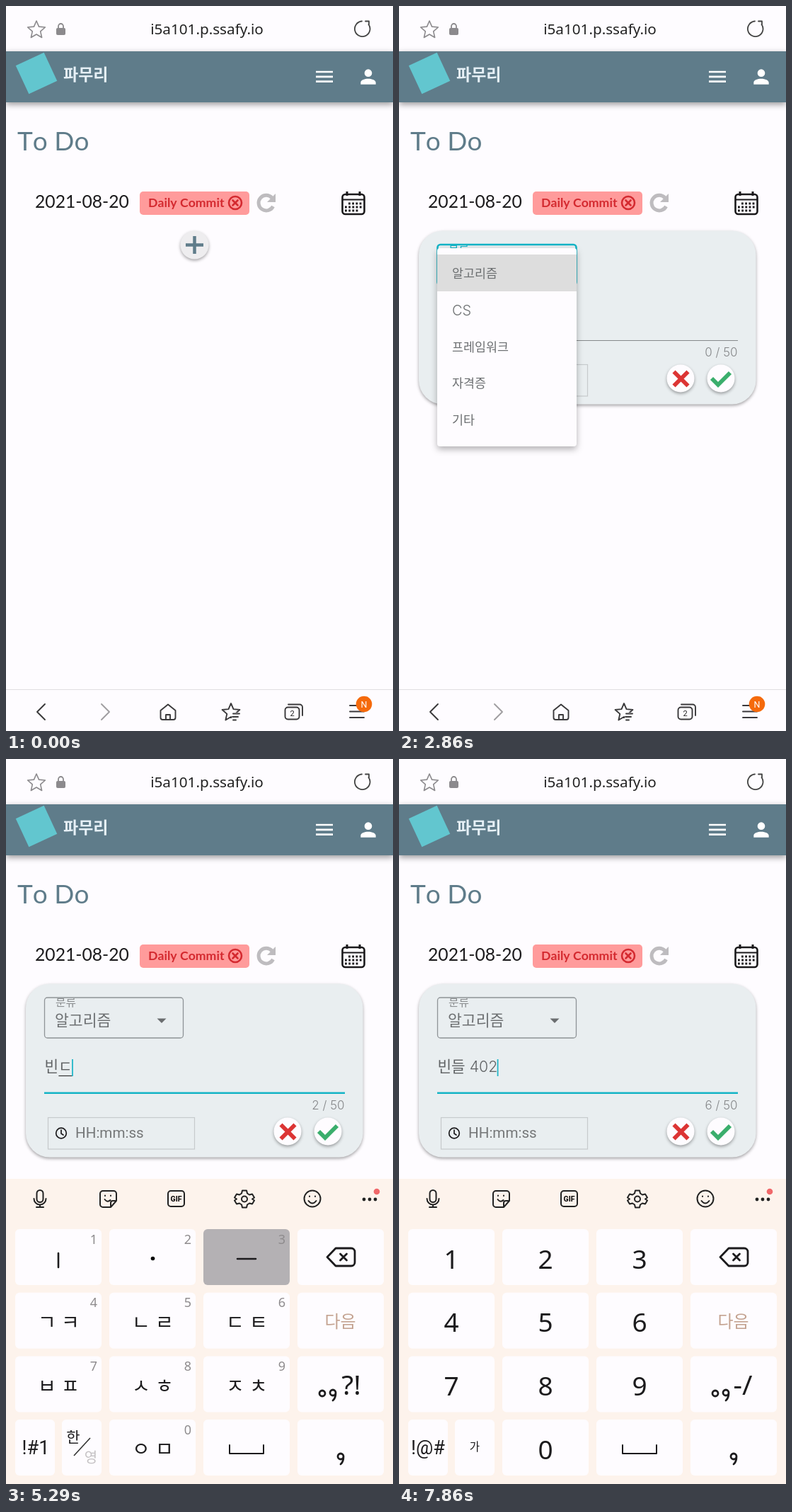
These frames come from a looping animation (547 by 1024 pixels, 8000 ms). An HTML page:

```html
<!DOCTYPE html>
<html lang="ko">
<head>
<meta charset="utf-8">
<title>To Do</title>
<style>
  html, body { margin: 0; width: 100%; height: 100%; overflow: hidden; background: #fefcff; }
  svg { display: block; width: 100vw; height: 100vh; }
  text { font-family: Inter, "Noto Sans CJK KR", "Noto Sans CJK", sans-serif; font-weight: 300; white-space: pre; }
  .lato { font-family: Lato, sans-serif; font-weight: 400; font-kerning: none; }
  .hand { font-family: "Noto Sans", "Noto Sans CJK KR", "Noto Sans CJK", sans-serif; font-weight: 400; }
  .roboto { font-family: Roboto, sans-serif; font-weight: 400; }
  .bold { font-weight: 700; }
  .medium { font-weight: 500; }
  .mid { text-anchor: middle; }
  .line { fill: none; stroke-linecap: round; stroke-linejoin: round; }
  .raised { filter: drop-shadow(0 2px 2px rgba(0, 0, 0, .35)); }
</style>
</head>
<body>
<svg viewBox="0 0 547 1024">
  <defs>
    <path id="star" d="M0-13L3.5-4.9 12.4-4 5.7 1.9 7.6 10.5 0 6-7.6 10.5-5.7 1.9-12.4-4-3.5-4.9z"/>
    <clipPath id="selectClip"><rect x="54" y="338" width="197" height="57"/></clipPath>
  </defs>
  <rect width="547" height="1024" fill="#fefcff"/>

  <!-- address bar -->
  <use href="#star" x="43" y="34" class="line" stroke="#8c8a8d" stroke-width="1.6"/>
  <rect x="71" y="31" width="13" height="10" rx="2" fill="#8c8a8d"/>
  <path d="M74 31v-2.500a3.500 3.500 0 0 1 7 0V31" class="line" stroke="#8c8a8d" stroke-width="1.800"/>
  <text x="284" y="40" class="hand mid" font-size="20.700" fill="#222">i5a101.p.ssafy.io</text>
  <path d="M503 21.500a10.800 10.800 0 1 0 9.500 4.500M508 21.500h5v5" class="line" stroke="#444" stroke-width="1.800"/>

  <!-- app header -->
  <rect y="64" width="547" height="72" fill="#5f7c8a" style="filter:drop-shadow(0 3px 4px rgba(0,0,0,.4))"/>
  <rect x="21" y="73" width="44" height="44" fill="#62c6cf" transform="rotate(-25 43 95)"/>
  <text x="81" y="105" class="bold" font-size="23" fill="#e6f0f6">파무리</text>
  <path d="M438 93h24m-24 6.800h24m-24 6.800h24" fill="none" stroke="#fff" stroke-width="2.700"/>
  <path transform="translate(496 84) scale(1.333)" fill="#fff" d="M12 4a4 4 0 1 1 0 8a4 4 0 1 1 0-8M12 14c4.420 0 8 1.790 8 4v2H4v-2c0-2.210 3.580-4 8-4"/>

  <!-- date row -->
  <text x="16" y="203.500" class="lato" font-size="37" fill="#5f7c8a">To Do</text>
  <text x="41" y="285" class="lato" font-size="24.700" fill="#1c1b1d">2021-08-20</text>
  <rect x="189" y="262" width="155" height="33" rx="5" fill="#ff9b9b"/>
  <text x="201" y="283.500" class="lato bold" font-size="17.700" fill="#d42a30">Daily Commit</text>
  <g class="line" stroke="#d42a30" stroke-width="2.600"><circle cx="324" cy="278" r="9"/><path d="M320.500 274.500l7 7m0-7l-7 7"/></g>
  <path d="M376 271a10.800 10.800 0 1 0 1.500 12" fill="none" stroke="#bebcbf" stroke-width="5"/>
  <path d="M381 265v12h-12z" fill="#bebcbf"/>
  <g fill="none" stroke="#1a191b">
    <rect x="475.500" y="266" width="31" height="28" rx="4" stroke-width="2.600"/>
    <path d="M476 273.500h30" stroke-width="2"/>
    <path d="M482 262v6m18-6v6" stroke-width="3"/>
    <path d="M484 279h20M479 284h25M479 289h20" stroke-width="2.800" stroke-dasharray="2.800 2.400"/>
  </g>

  <g id="addButton">
    <circle id="addDisc" cx="266.500" cy="337.500" r="20" class="raised"/>
    <path d="M254 337.500h25m-12.500-12.500v25" fill="none" stroke="#5f7c8a" stroke-width="4.500"/>
  </g>

  <g id="form">
    <rect x="28" y="317.500" width="476.500" height="245" rx="34" fill="#e9eef0" class="raised"/>
    <rect id="selectBox" x="54.500" y="337" width="196" height="57" rx="4" fill="none"/>
    <g clip-path="url(#selectClip)"><text id="label" x="70">분류</text></g>
    <text id="value" x="69" y="376.500" font-size="21.600" fill="#6c6f71">알고리즘</text>
    <path id="arrow" d="M-6.500-3h13l-6.500 6.500z"/>
    <text id="placeholder" x="54.500" y="442" font-size="21.300" fill="#a3a6a8">할 일을 입력해주세요.</text>
    <text id="entry" x="54.500" y="442" font-size="21.300" fill="#606365"></text>
    <path id="composing" stroke="#333" stroke-width="1.200"/>
    <path id="caret" stroke="#22b6c8" stroke-width="1.800"/>
    <path id="rule" d="M54 472.500h425" stroke-width="1"/>
    <path id="focusRule" stroke="#14b4c6" stroke-width="2.600"/>
    <text id="counter" x="478.500" y="495" font-size="17" fill="#858789" text-anchor="end"></text>
    <rect x="59.500" y="506.500" width="207" height="44.500" fill="none" stroke="#c6cacc" stroke-width="1.200"/>
    <g class="line" stroke="#1c1b1d" stroke-width="1.700"><circle cx="78" cy="528.500" r="7.300"/><path d="M78 524v5l3 2"/></g>
    <text x="98" y="535" class="roboto" font-size="20.600" fill="#757778">HH:mm:ss</text>
    <g fill="#fefcff" class="raised"><circle cx="398" cy="526" r="19.500"/><circle cx="455" cy="526" r="19.500"/></g>
    <path d="M388.500 516.500l20 20m0-20l-20 20" stroke="#dc3434" stroke-width="5.800"/>
    <path d="M442 526l9 9 17-17" fill="none" stroke="#3aae6c" stroke-width="5.800"/>
  </g>

  <g id="menu">
    <rect x="54" y="342" width="197" height="280" rx="4" fill="#fefcff" style="filter:drop-shadow(0 4px 5px rgba(0,0,0,.3))"/>
    <rect id="menuPress" x="54" y="351" width="197" height="52" fill="#ddd"/>
  </g>

  <!-- browser navigation -->
  <path d="M0 965.500h547" stroke="#e0dee1" stroke-width="1.200"/>
  <g class="line" stroke="#3a393b" stroke-width="1.900">
    <path d="M55 986l-11 11 11 11"/>
    <path d="M135 986l11 11-11 11" stroke="#a09ea1"/>
    <path d="M218.500 995l10.500-8.500 10.500 8.500v10a3 3 0 0 1-3 3h-15a3 3 0 0 1-3-3zM226 1008v-7h6v7"/>
    <use href="#star" x="318" y="998"/>
    <path d="M319 998h14v13h-14z" fill="#fefcff" stroke="none"/>
    <path d="M321 999.500h9m-10 4.500h8m-7 4.500h4"/>
    <rect x="394.500" y="990.500" width="20" height="17" rx="4"/>
    <path d="M399 986.500h16a4 4 0 0 1 4 4V1002"/>
    <path d="M486 988h12m-12 8.500h20m-20 8.500h20"/>
  </g>
  <text x="404.500" y="1003" class="roboto mid" font-size="11" fill="#222">2</text>
  <circle cx="506" cy="986" r="11.300" fill="#f56a0c"/>
  <text x="506" y="990.500" class="roboto mid" font-size="12.500" fill="#fff">N</text>

  <g id="keyboard">
    <rect y="593" width="547" height="431" fill="#fdf3ec"/>
    <g class="line" stroke="#222" stroke-width="2">
      <rect x="43.500" y="609" width="9" height="17" rx="4.500"/><path d="M39.500 621a8.500 8.500 0 0 0 17 0M48 630v3m-5 0h10"/>
      <path d="M137 610h15a4 4 0 0 1 4 4v10l-8 9h-11a4 4 0 0 1-4-4v-15a4 4 0 0 1 4-4M156 624h-5a3 3 0 0 0-3 3v6M139.500 622q4 5 8 1M140 616.500v.5m8-.5v.5"/>
      <rect x="229" y="610" width="23" height="22" rx="4"/>
      <path transform="translate(0 -1.500)" d="M334 611h6l1 4 3 2 4-1 3 5-3 2 3 2-3 5-4-1-3 2-1 4h-6l-1-4-3-2-4 1-3-5 3-2-3-2 3-5 4 1 3-2z"/>
      <circle cx="337" cy="621.500" r="4"/>
      <circle cx="433" cy="621" r="11.500"/><path d="M427.500 624q5.500 7 11 0M429 617.500v.5m8-.5v.5"/>
    </g>
    <text x="240.500" y="625" class="roboto mid bold" font-size="10.500">GIF</text>
    <g fill="#222"><circle cx="506" cy="622" r="2.400"/><circle cx="514" cy="622" r="2.400"/><circle cx="522" cy="622" r="2.400"/></g>
    <circle cx="524" cy="611" r="4.300" fill="#f0686a"/>
    <g id="keys"></g>
    <g class="line" stroke="#1c1b1d" stroke-width="2.800">
      <path d="M466 691h22a5 5 0 0 1 5 5v15a5 5 0 0 1-5 5h-22l-12-12.500zM472.500 699l9 9m0-9l-9 9"/>
      <path d="M316 969v12h48v-12" stroke-width="2"/>
      <path id="commas"/>
    </g>
    <text x="472.500" y="803" class="hand mid" font-size="24" fill="#c4a391">다음</text>
    <g id="hangul">
      <path d="M74 698v20M327 706h26" class="line" stroke="#1c1b1d" stroke-width="2.600"/>
      <circle cx="207.500" cy="705.500" r="2.800"/>
      <text x="488" y="898" class="hand medium mid" font-size="39" fill="#1c1b1d">?!</text>
      <text x="42" y="982" class="roboto mid" font-size="27" fill="#1c1b1d">!#1</text>
      <text x="95" y="965" class="hand mid" font-size="21" fill="#1c1b1d">한</text>
      <path d="M96 984l23-25" stroke="#333" stroke-width="1.600"/>
      <text x="120" y="994" class="hand mid" font-size="20" fill="#c4c1c3">영</text>
    </g>
    <g id="numeric">
      <text x="486" y="898" class="hand medium mid" font-size="39" fill="#1c1b1d">-/</text>
      <text x="41" y="982" class="roboto mid" font-size="27" fill="#1c1b1d">!@#</text>
      <text x="107" y="977" class="hand mid" font-size="15.500" fill="#1c1b1d">가</text>
    </g>
  </g>
</svg>
<script>
const LOOP = 8000, STEPS_PER_SECOND = 7;
const TEAL = '#14b4c6';
const $ = id => document.getElementById(id);

function set(node, attrs) {
  for (const name in attrs) node.setAttribute(name, attrs[name]);
  return node;
}
function add(parent, tag, attrs, text = '') {
  const node = set(document.createElementNS('http://www.w3.org/2000/svg', tag), attrs);
  node.textContent = text;
  return parent.appendChild(node);
}
// Text whose capitals or syllables are centred on cy.
function label(parent, text, x, cy, size, fill, cls) {
  add(parent, 'text', { x, y: cy + size * .37, 'font-size': size, fill, class: cls }, text);
}
const show = (id, on) => $(id).style.display = on ? '' : 'none';

['알고리즘', 'CS', '프레임워크', '자격증', '기타'].forEach((item, i) =>
  label($('menu'), item, 75, 377.5 + 51.8 * i, item === 'CS' ? 20 : 17.4, '#6c6f71', ''));

const digits = '123 456 789  0';
const jamo = { 4: 'ㄱㅋ', 5: 'ㄴㄹ', 6: 'ㄷㅌ', 8: 'ㅂㅍ', 9: 'ㅅㅎ', 10: 'ㅈㅊ', 13: 'ㅇㅁ' };
const keys = [];
for (let i = 0; i < 16; i++) {
  const x = 13 + 133 * (i % 4), y = 664 + 89.7 * (i >> 2);
  const key = { x, y, width: i === 12 ? 56 : 122, height: 79, rx: 6, fill: '#fefcff' };
  keys.push(add($('keys'), 'rect', key));
  if (i === 12) add($('keys'), 'rect', { ...key, x: 79 });
  if (digits[i]?.trim()) {
    label($('hangul'), digits[i], x + 111, y + 14, 18, '#8e8b8d', 'hand mid');
    label($('numeric'), digits[i], x + 61, y + 42, 37, '#1c1b1d', 'hand medium mid');
  }
  [...(jamo[i] || '')].forEach((letter, n) =>
    label($('hangul'), letter, x + 45 + 33 * n, y + 42, 28, '#1c1b1d', 'hand medium mid'));
}
const ring = (x, y) => `M${x + 4} ${y}a4 4 0 1 0-8 0a4 4 0 1 0 8 0`;
set($('commas'), { d: ring(447, 896) + ring(462, 895) + 'q0 8-4 11' + ring(473, 985) + 'q0 8-4 11' });

// [step, text in the field, pressed key]
const typing = [
  [0, ''], [30, '', 8], [31, 'ㅂ'], [32, 'ㅂ', 0], [33, '비'], [34, '비', 5], [35, '빈'],
  [36, '빈', 6], [37, '빈ㄷ', 2], [38, '빈드'], [39, '빈드', 5], [40, '빈든', 5], [41, '빈들'],
  [42, '빈들', 14], [43, '빈들 '], [46, '빈들 ', 12], [47, '빈들 '], [48, '빈들 ', 4],
  [49, '빈들 4'], [50, '빈들 4', 13], [51, '빈들 40', 1], [52, '빈들 402']
];

function drawSelect(step) {
  const focused = step >= 13 && step <= 26;
  const floated = step < 14 ? 0 : step === 14 ? .62 : 1;
  const open = step === 14 || step === 21 ? .62 : step > 14 && step < 21 ? 1 : 0;
  const border = !focused ? '#8f9497' : step < 15 ? '#1b4552' : TEAL;
  const size = 21.4 - 5.6 * floated;
  set($('selectBox'), { stroke: border, 'stroke-width': focused ? 2.6 : 1.3 });
  set($('label'), { y: 367 - 24 * floated + size * .37, 'font-size': size, fill: focused ? TEAL : '#8a8d8f' });
  set($('arrow'), { transform: `translate(220 369.500) rotate(${180 * open})`, fill: focused ? TEAL : '#6a6d6f' });
  show('value', step >= 21);
  show('menu', open);
  show('menuPress', step === 20);
  $('menu').style.opacity = open;
}

function drawEntry(step) {
  const [, text, pressed] = typing.findLast(([start]) => step >= start);
  $('entry').textContent = text;
  const end = 54.8 + (text ? $('entry').getComputedTextLength() : 0);
  const active = step >= 26;
  show('placeholder', !active);
  show('caret', active);
  set($('caret'), { d: `M${end} 424v24` });
  show('composing', text && step < 43);
  set($('composing'), { d: `M${end - 19.6} 447.500h19.600` });
  set($('rule'), { stroke: active ? '#333' : '#85898b' });
  const half = step < 27 ? 0 : step === 27 ? 110 : 212.5;
  set($('focusRule'), { d: `M${266.5 - half} 471.800h${2 * half}` });
  $('counter').textContent = `${text.length} / 50`;
  keys.forEach((key, i) => set(key, { fill: i === pressed ? '#b4b1b4' : '#fefcff' }));
}

function draw(time) {
  const step = Math.floor((time % LOOP + 4) * STEPS_PER_SECOND / 1000);
  const formOpen = step >= 7;
  show('form', formOpen);
  show('addButton', !formOpen);
  set($('addDisc'), { fill: step === 6 ? '#d3d8da' : '#eeedef' });
  drawSelect(step);
  drawEntry(step);
  show('keyboard', step >= 28);
  set($('keyboard'), { transform: `translate(0 ${step === 28 ? 150 : 0})` });
  show('hangul', step < 47);
  show('numeric', step >= 47);
}

const start = performance.now();
(function tick() {
  draw(performance.now() - start);
  requestAnimationFrame(tick);
})();
</script>
</body>
</html>
```
